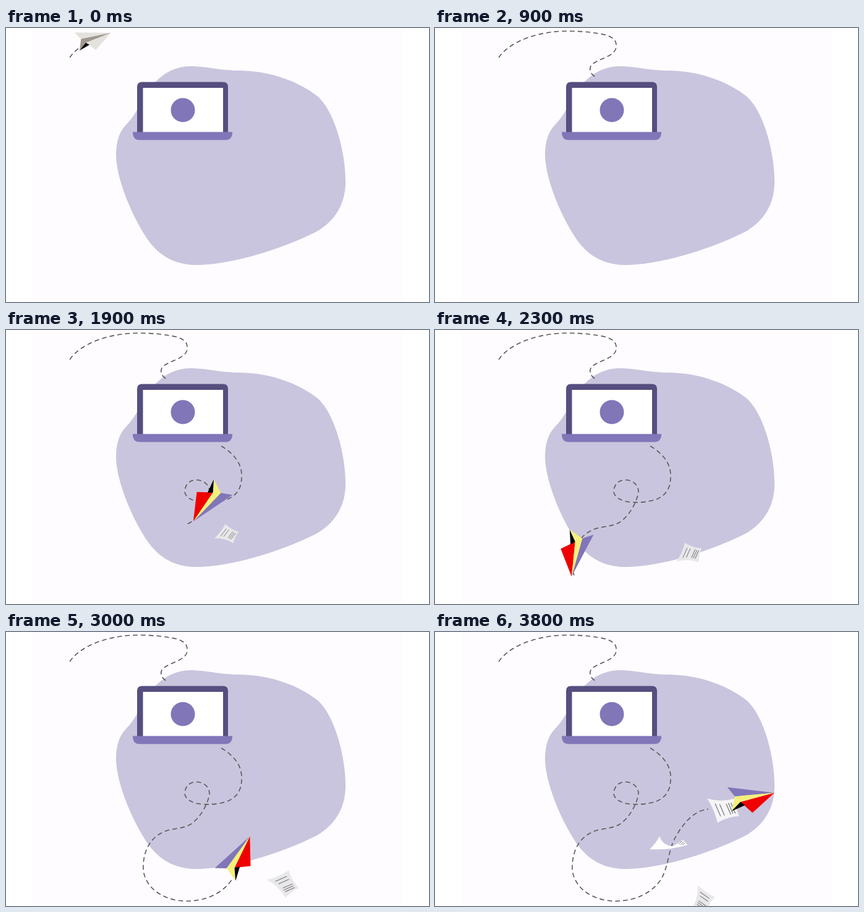
An HTML page without scripts for the animation above (3.9 s loop, 684 px wide and 444 px high).

```html
<!DOCTYPE html>
<html lang="en">
<head>
<meta charset="utf-8">
<title>Paper plane</title>
<style>
  html, body { margin: 0; width: 100%; height: 100%; overflow: hidden; background: #fff; }
  svg { display: block; width: 684px; height: 444px; }

  .trail { fill: none; stroke: #5b5758; stroke-width: 1.6; stroke-dasharray: 7.6 5.1; }
  .reveal { fill: none; stroke: #fff; stroke-width: 5; stroke-dasharray: 1000; }

  /* Everything advances ten times a second */
  .reveal, .plane, .sheet { animation: 3900ms -5ms infinite steps(1); }

  #reveal-in { animation-name: reveal-in; }
  #reveal-out { animation-name: reveal-out; }
  @keyframes reveal-in {
    0% { stroke-dashoffset: 977px; animation-timing-function: steps(9); }
    23.07%, 100% { stroke-dashoffset: 690px; }
  }
  @keyframes reveal-out {
    0% { stroke-dashoffset: 1000px; }
    23.07% { stroke-dashoffset: 1000px; animation-timing-function: steps(4); }
    33.33% { stroke-dashoffset: 873px; animation-timing-function: steps(6); }
    48.71% { stroke-dashoffset: 685px; animation-timing-function: steps(4); }
    58.97% { stroke-dashoffset: 558px; animation-timing-function: steps(7); }
    76.92% { stroke-dashoffset: 392px; animation-timing-function: steps(6); }
    92.3%, 100% { stroke-dashoffset: 240px; }
  }

  .wing { fill: var(--wing); }
  .fold { fill: var(--fold); }
  .side { fill: var(--side); }
  #plane-in {
    --wing: #e3e2dc; --fold: #a0978f; --side: #e3e2dc;
    offset-path: path("M103 48C122 20 170 5 214 5C240 5 262 8 275 11C290 15 294 22 293 31C291 47 262 50 253 60C248 67 252 75 259 79L290 130");
    animation-name: fly-in;
  }
  #plane-out {
    --wing: #8176b8; --fold: #f5f07c; --side: #f00000;
    offset-path: path("M296 150L348 188C370 201 382 218 381 238C381 258 372 268 359 274C345 279 325 281 310 278C296 275 288 268 289 260C291 248 298 243 308 243C320 243 329 251 329 262C327 278 314 302 298 312C284 320 265 317 249 327C230 338 221 360 222 385C225 415 255 436 292 436C325 436 352 422 366 400C378 378 377 355 388 334C402 308 420 289 442 287Q478 281 511 271");
    animation-name: fly-out;
  }
  /* The nose leans into the coming bend */
  @keyframes fly-in {
    0% { offset-distance: 49px; offset-rotate: auto 0deg; animation-timing-function: steps(5); }
    12.82% { offset-distance: 218px; offset-rotate: auto 10deg; animation-timing-function: steps(4); }
    23.07%, 100% { offset-distance: 351px; offset-rotate: auto 0deg; }
  }
  @keyframes fly-out {
    0% { offset-distance: 0; offset-rotate: auto 0deg; }
    23.07% { offset-distance: 0; offset-rotate: auto 0deg; }
    25.64% { offset-distance: 21px; offset-rotate: auto 5deg; animation-timing-function: steps(3); }
    33.33% { offset-distance: 124px; offset-rotate: auto 22deg; animation-timing-function: steps(6); }
    48.71% { offset-distance: 328px; offset-rotate: auto 10deg; animation-timing-function: steps(4); }
    58.97% { offset-distance: 466px; offset-rotate: auto -11deg; animation-timing-function: steps(7); }
    76.92% { offset-distance: 707px; offset-rotate: auto 11deg; animation-timing-function: steps(5); }
    89.74% { offset-distance: 876px; offset-rotate: auto 0deg; }
    92.3% { offset-distance: 886px; offset-rotate: auto 0deg; }
    94.87%, 100% { offset-distance: 889px; offset-rotate: auto 0deg; }
  }

  #sheet-a { animation-name: drop-a; }
  #sheet-b { animation-name: drop-b; }
  #sheet-c { animation-name: drop-c; }
  @keyframes drop-a {
    0% { visibility: hidden; }
    43.58% { visibility: visible; translate: 330px 296px; rotate: -40deg; scale: .45; animation-timing-function: steps(2); }
    48.71% { visibility: visible; translate: 357px 331px; rotate: -53deg; scale: .86; animation-timing-function: steps(4); }
    58.97% { visibility: visible; translate: 411px 363px; rotate: -66deg; scale: .98; animation-timing-function: steps(7); }
    76.92% { visibility: visible; translate: 449px 407px; rotate: -24deg; scale: 1.14; animation-timing-function: steps(6); }
    92.3%, 100% { visibility: visible; translate: 433px 433px; rotate: 35deg; scale: 1; }
  }
  @keyframes drop-b {
    0% { visibility: hidden; }
    84.61% { visibility: visible; translate: 398px 310px; rotate: -25deg; scale: .6; animation-timing-function: steps(5); }
    97.43%, 100% { visibility: visible; translate: 377px 343px; rotate: 0deg; scale: 1; }
  }
  @keyframes drop-c {
    0% { visibility: hidden; }
    89.74% { visibility: visible; translate: 472px 278px; rotate: -12deg; scale: .7; animation-timing-function: steps(3); }
    97.43%, 100% { visibility: visible; translate: 466px 286px; rotate: 0deg; scale: 1; }
  }
</style>
</head>
<body>
<svg viewBox="0 0 684 444">
  <defs>
    <path id="route-in" d="M103 48C122 20 170 5 214 5C240 5 262 8 275 11C290 15 294 22 293 31C291 47 262 50 253 60C248 67 252 75 259 79"/>
    <path id="route-out" d="M348 188C370 201 382 218 381 238C381 258 372 268 359 274C345 279 325 281 310 278C296 275 288 268 289 260C291 248 298 243 308 243C320 243 329 251 329 262C327 278 314 302 298 312C284 320 265 317 249 327C230 338 221 360 222 385C225 415 255 436 292 436C325 436 352 422 366 400C378 378 377 355 388 334C402 308 420 289 442 287"/>
    <mask id="mask-in" maskUnits="userSpaceOnUse" x="0" y="0" width="684" height="444">
      <use href="#route-in" id="reveal-in" class="reveal"/>
    </mask>
    <mask id="mask-out" maskUnits="userSpaceOnUse" x="0" y="0" width="684" height="444">
      <use href="#route-out" id="reveal-out" class="reveal"/>
    </mask>
    <g id="plane" transform="rotate(16)">
      <path class="wing" d="M-38-20L38-10L-26-5Z"/>
      <path class="side" d="M38-10L-17 4L2 22Z"/>
      <path class="fold" d="M38-10L-26-5L-32 19L-17 4Z"/>
      <path d="M-32 19L-17 4L-10 9.5Z"/>
    </g>
    <g id="sheet">
      <path d="M-20-14Q-3-11 14-14Q12 2 17 15Q5 15-6 20Q-8 0-20-14Z"/>
      <path d="M-10-7H8M-7-2H9M-4 6H11M-4 9H11M-3 12H12" stroke="#77777b" stroke-width="1"/>
    </g>
  </defs>

  <rect x="42" width="600" height="444" fill="#fefcff"/>
  <path fill="#c9c5de" d="M298 62C325 62 345 69 380 69C430 70 475 88 503 110C532 134 550 205 549 252C548 290 528 316 500 331C440 361 360 384 307 384C268 383 246 366 230 344C205 308 178 245 178 205C178 185 183 168 194 157C212 138 218 120 228 104C244 80 268 62 298 62Z"/>

  <g mask="url(#mask-in)"><use href="#route-in" class="trail"/></g>
  <g mask="url(#mask-out)"><use href="#route-out" class="trail"/></g>

  <g id="sheet-a" class="sheet" fill="#e8e8ea"><use href="#sheet"/></g>
  <g id="sheet-b" class="sheet" fill="#fff">
    <path d="M-30 9Q-20 0-14-12Q-8 4 8 4L24-6L31 2Q2 11-30 9Z"/>
    <path d="M17 1L22-4M20 2L25-3M23 2L27-1" stroke="#77777b"/>
  </g>
  <g id="sheet-c" class="sheet" fill="#f5f5f7">
    <use href="#sheet" transform="rotate(67) scale(1.25 -1.25)"/>
  </g>

  <g id="plane-in" class="plane"><use href="#plane" transform="scale(.77)"/></g>
  <g id="plane-out" class="plane"><use href="#plane"/></g>

  <path fill="#554e7f" d="M212 169V95.500Q212 87.500 220 87.500H351Q359 87.500 359 95.500V169Z"/>
  <path fill="#fff" d="M221.500 97H351V169H221.500Z"/>
  <path fill="#8176b8" d="M205 168.500H366Q366 181.500 355 181.500H216Q205 181.500 205 168.500Z"/>
  <circle cx="286" cy="133" r="19.500" fill="#8176b8"/>
</svg>
</body>
</html>
```
